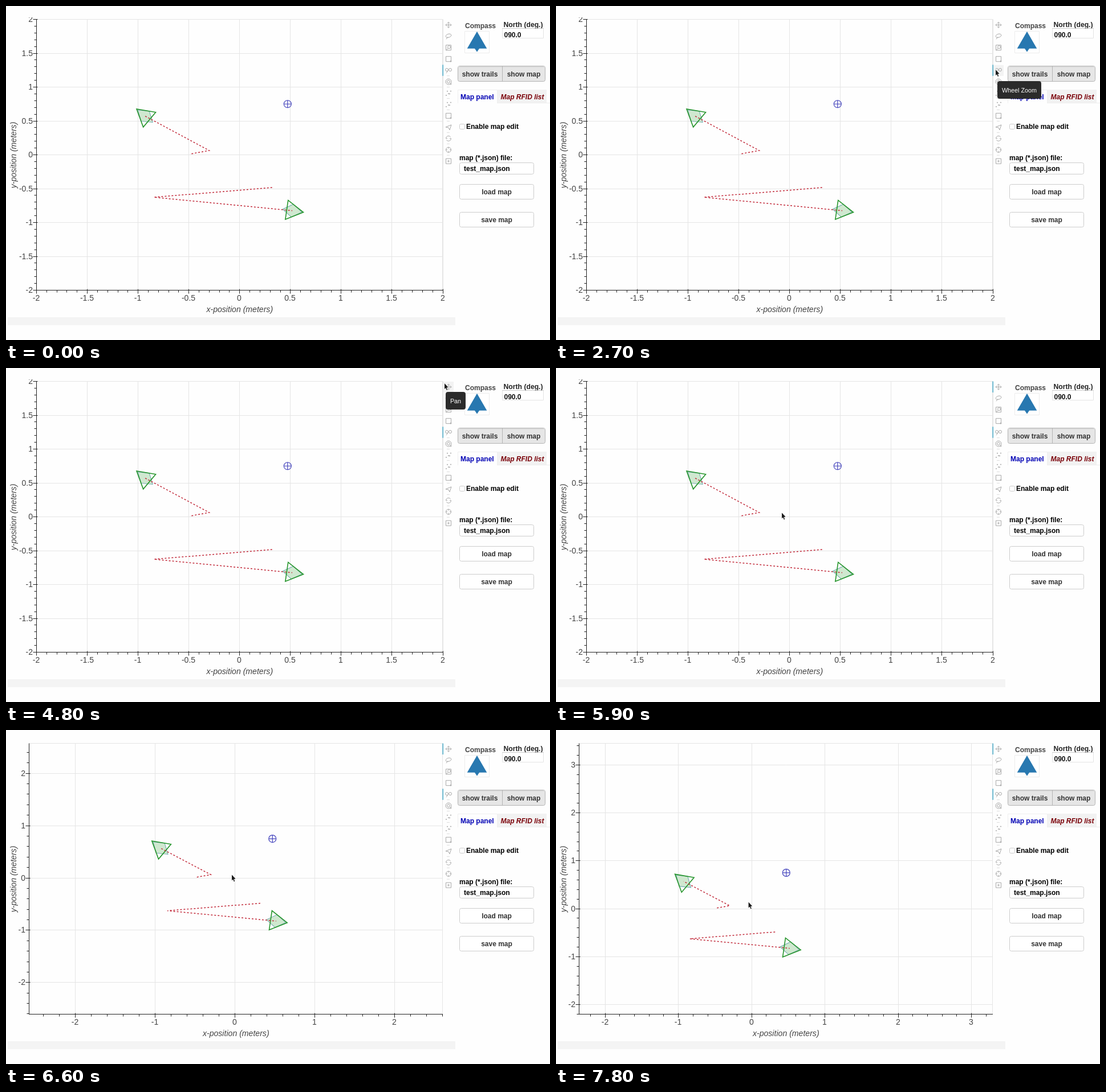
Animation of 954x587 px, one loop 8000 ms. Source, as an HTML page with a canvas:

```html
<!DOCTYPE html>
<html lang="en">
<head>
<meta charset="utf-8">
<title>Position map</title>
<style>
html, body { margin: 0; width: 100%; height: 100%; overflow: hidden; background: #fefefe; }
canvas { display: block; }
</style>
</head>
<body>
<canvas id="stage" width="954" height="587"></canvas>
<script>
const ctx = document.getElementById('stage').getContext('2d');
const LOOP = 8000, FRAME = 100, RIGHT = 766, TOP = 23.5, BOTTOM = 499.5;
const SANS = '"Liberation Sans", Arial, sans-serif';
const BOLD = 'bold 12px ' + SANS;

const ZOOM_TIMES = [6300, 6500, 6600, 7000];
const DRAG = { start: 7200, length: 500, x: -57.4, y: 54.5 };
const MOVES = [
  { start: 1100, end: 1400, x: 624, y: 137 },
  { start: 1500, end: 1800, x: 761.5, y: 118 },
  { start: 1900, end: 2300, x: 771, y: 112 },
  { start: 3300, end: 3600, x: 775, y: 65 },
  { start: 3700, end: 4000, x: 769, y: 27 },
  { start: 5400, end: 5900, x: 396, y: 254.5 },
  { start: 7000, end: 7200, x: 395, y: 248 }
];
const VEHICLES = [
  { heading: 220, trail: [[-0.93, 0.571], [-0.3, 0.063], [-0.474, 0.015]] },
  { heading: 8.3, trail: [[0.518, -0.825], [-0.843, -0.627], [0.32, -0.484]] }
];

const progress = (t, start, length) => Math.min(1, Math.max(0, (t - start) / length));
const smooth = k => k * k * (3 - 2 * k);

function dragOffset(t) {
  const k = progress(t, DRAG.start, DRAG.length);
  const steep = k ** 3 / (k ** 3 + (1 - k) ** 3);
  return { x: DRAG.x * k ** 1.73, y: DRAG.y * steep };
}

function getPointer(t) {
  if (t < 1000) return null;
  const p = { x: 316.5, y: 20 }, drag = dragOffset(t);
  for (const m of MOVES) {
    const k = smooth(progress(t, m.start, m.end - m.start));
    p.x += (m.x - p.x) * k;
    p.y += (m.y - p.y) * k;
  }
  return { x: p.x + drag.x, y: p.y + drag.y };
}

// The plot follows the pointer one frame late
function getView(t) {
  const n = ZOOM_TIMES.filter(z => z <= t).length;
  const zoom = 1.09 ** n, left = n ? 40.5 : 53.5;
  const mid = (left + RIGHT) / 2, drag = dragOffset(t - FRAME);
  const x0 = (n ? 394 + (mid - 394) / zoom : mid) + drag.x;
  const y0 = 255 + 6.5 / zoom + drag.y;
  const sx = (RIGHT - left) / 4 / zoom, sy = (BOTTOM - TOP) / 4 / zoom;
  return { left, mid, step: n ? 1 : 0.5, x: v => x0 + v * sx, y: v => y0 - v * sy };
}

function path(points, closed) {
  ctx.beginPath();
  points.forEach(([x, y]) => ctx.lineTo(x, y));
  if (closed) ctx.closePath();
}

function stroke(color, width = 1) {
  ctx.strokeStyle = color;
  ctx.lineWidth = width;
  ctx.stroke();
}

function line(x1, y1, x2, y2, color, width) {
  path([[x1, y1], [x2, y2]]);
  stroke(color, width);
}

function rect(x, y, w, h, color) {
  ctx.fillStyle = color;
  ctx.fillRect(x, y, w, h);
}

function box(x, y, w, h, fill, border, radius = 0) {
  ctx.beginPath();
  ctx.roundRect(x + 0.5, y + 0.5, w - 1, h - 1, radius);
  ctx.fillStyle = fill;
  ctx.fill();
  stroke(border);
}

function text(str, x, y, color = '#000', font = BOLD, align = 'left') {
  ctx.font = font;
  ctx.fillStyle = color;
  ctx.textAlign = align;
  ctx.fillText(str, x, y);
}

// Runs draw around a moved and turned origin
function at(x, y, degrees, draw) {
  ctx.save();
  ctx.translate(x, y);
  ctx.rotate(degrees * Math.PI / 180);
  draw();
  ctx.restore();
}

// Calls draw(pixel, value, isMajor) for every tick inside the range
function eachTick(toPixel, low, high, step, draw) {
  for (let i = -25; i <= 25; i++) {
    const value = i * step / 5, p = toPixel(value);
    if (p >= low - 0.1 && p <= high + 0.1) draw(Math.floor(p) + 0.5, value, i % 5 === 0);
  }
}

function drawAxes(view) {
  const { left, mid, step } = view;
  const tickFont = '14px ' + SANS, titleFont = 'italic 14.1px ' + SANS;
  const ink = '#444', grid = '#e5e5e5', axis = '#222';
  const xTicks = draw => eachTick(view.x, left, RIGHT, step, draw);
  const yTicks = draw => eachTick(view.y, TOP, BOTTOM, step, draw);

  xTicks((p, v, major) => major && line(p, TOP, p, BOTTOM, grid));
  yTicks((p, v, major) => major && line(left, p, RIGHT, p, grid));
  ctx.strokeStyle = grid;
  ctx.strokeRect(left, TOP, RIGHT - 0.5 - left, BOTTOM - TOP);

  ctx.save();
  ctx.beginPath();
  ctx.rect(0, 20, 790, 530);
  ctx.clip();
  line(left, TOP, left, BOTTOM + 0.5, axis);
  line(left, BOTTOM, RIGHT, BOTTOM, axis);
  xTicks((p, v, major) => {
    line(p, BOTTOM - (major ? 2 : 0), p, BOTTOM + (major ? 6 : 4), axis);
    if (major) text(String(v), p - 0.5, 518, ink, tickFont, 'center');
  });
  yTicks((p, v, major) => {
    line(left + (major ? 2 : 0), p, left - (major ? 6 : 4), p, axis);
    if (major) text(String(v), left - 6.5, p + 4.5, ink, tickFont, 'right');
  });
  text('x-position (meters)', mid, 538, ink, titleFont, 'center');
  at(17.5, 262, -90, () => text('y-position (meters)', 0, 0, ink, titleFont, 'center'));
  ctx.restore();
}

const trianglePoints = r => [[1.155 * r, 0], [-0.577 * r, r], [-0.577 * r, -r]];
const diamondPoints = r => [[r, 0], [0, r / 1.5], [-r, 0], [0, -r / 1.5]];

function drawVehicle(view, { heading, trail }) {
  const points = trail.map(([x, y]) => [view.x(x), view.y(y)]);
  at(...points[0], heading, () => {
    path(diamondPoints(17), true);
    ctx.fillStyle = '#cfe8cf';
    ctx.fill();
    stroke('#78aeb4', 1.1);
    path(trianglePoints(17), true);
    stroke('#25952b', 1.6);
  });
  ctx.setLineDash([3, 3]);
  path(points.reverse());
  stroke('#c22b3b', 1.5);
  ctx.setLineDash([]);
}

function drawBeacon(x, y) {
  at(x, y, 0, () => {
    ctx.beginPath();
    ring(6.5)();
    spokes(0, 6.5)();
    stroke('#4444bd', 1.2);
  });
}

// Icon parts add to the current path around the origin
const ring = (r, x = 0, y = 0) => () => { ctx.moveTo(x + r, y); ctx.arc(x, y, r, 0, 7); };
const square = () => ctx.rect(-4.5, -4.5, 9, 9);
const spokes = (from, to, head = 0) => () => {
  for (let i = 0; i < 4; i++) {
    ctx.moveTo(from, 0);
    ctx.lineTo(to, 0);
    ctx.moveTo(to - head, -head);
    ctx.lineTo(to, 0);
    ctx.lineTo(to - head, head);
    ctx.rotate(Math.PI / 2);
  }
};
const scatter = () => {
  for (let i = 0; i < 5; i++) ctx.rect(2 * i - 4.5, 4 * Math.cos(i * 2.5) - 0.5, 1, 1);
};
const tail = () => { ctx.moveTo(-1, 1); ctx.lineTo(-4, 5); };
const lens = ring(2.5, 1, -1), dot = ring(1, 4, 4);
const lasso = () => ctx.ellipse(0, -1, 5, 3, -0.3, 0, 7);
const plane = () => [[-5, 0], [5, -4], [2, 5], [0, 1], [-5, 0]].forEach(([x, y]) => ctx.lineTo(x, y));
const arcs = () => [0, 180].forEach(() => {
  ctx.rotate(Math.PI);
  ctx.moveTo(4.5, 0);
  ctx.arc(0, 0, 4.5, 0, 2.5);
  ctx.moveTo(4.5, 0);
  ctx.lineTo(2, 0);
});
const ICONS = [
  [spokes(0, 5, 2)], [lasso, tail], [square, lens, tail], [square, dot],
  [ring(2.5, -3, -1), ring(2.5, 3, -1), tail], [ring(5), ring(2.5), dot],
  [scatter], [scatter], [square, dot], [plane], [arcs],
  [ring(4.5), spokes(2, 5)], [square, spokes(0, 2)]
];

function drawToolbar(t, pointer) {
  const rowHeight = 19.95;
  const bar = row => rect(765.5, 23.5 + row * rowHeight, 1.5, 19.5, '#4bacc9');
  ICONS.forEach((parts, i) => {
    const y = 33 + i * rowHeight;
    const hovered = pointer && pointer.x >= 767 && Math.abs(pointer.y + 1 - y) < rowHeight / 2;
    if (hovered) rect(767, y - 9, 18, 19, '#f3f3f3');
    if (i > 3 && i < 12) line(773, y + 9.8, 778, y + 9.8, '#dedede');
    at(776, y + 0.3, 0, () => {
      ctx.beginPath();
      parts.forEach(part => part());
      stroke('#a9a9a9');
    });
  });
  bar(4);
  if (t >= 5200) bar(0);
}

function button(label, y) {
  box(795, y, 131, 27, '#fff', '#ccc', 3);
  text(label, 860.5, y + 18, '#333', BOLD, 'center');
}

function drawPanel() {
  rect(3, 547, 785, 14, '#f4f4f4');

  text('Compass', 805, 39, '#444');
  box(804, 44, 44, 39, '#fff', '#ececec');
  at(826, 64.7, -90, () => {
    ctx.fillStyle = '#2878b0';
    [trianglePoints(17.3), diamondPoints(16)].forEach(points => { path(points, true); ctx.fill(); });
  });

  text('North (deg.)', 872.5, 37, '#222', 'bold 12.2px ' + SANS);
  box(870, 39, 73, 18, '#fff', '#e4e4e4');
  line(870, 39.5, 943, 39.5, '#ccc');
  text('090.0', 873.5, 55, '#111');

  box(792, 105, 154, 28, '#e6e6e6', '#b4b4b4', 3);
  rect(793, 106, 152, 2, '#dadada');
  line(870.5, 106, 870.5, 132, '#b4b4b4');
  text('show trails', 831, 124, '#333', BOLD, 'center');
  text('show map', 908, 124, '#333', BOLD, 'center');

  rect(862, 147, 86, 24, '#f2f2f2');
  line(861, 170.5, 954, 170.5, '#eee');
  path([[792.5, 171], [792.5, 147.5], [861.5, 147.5], [861.5, 171]]);
  stroke('#efefef');
  text('Map panel', 797, 164, '#0000b4');
  text('Map RFID list', 867.5, 164, '#7a0008', 'italic ' + BOLD);

  box(795, 207, 10, 10, '#fff', '#ccc', 2);
  text('Enable map edit', 807, 216);
  text('map (*.json) file:', 795, 271);
  box(795, 275, 131, 21, '#fff', '#ccc', 3);
  text('test_map.json', 803, 290);
  button('load map', 313);
  button('save map', 362);
}

function drawTooltip(label, x, y, w) {
  box(x, y, w, 31, '#2b2b2b', '#2b2b2b', 3);
  text(label, x + w / 2, y + 19.5, '#fff', '10.8px ' + SANS, 'center');
}

function drawCursor({ x, y }) {
  at(x, y, 0, () => {
    path([[0, 0], [0, 10], [2.2, 8], [3.8, 12], [5.2, 11.4], [3.8, 7.5], [6.6, 7]], true);
    stroke('#fff', 1.4);
    ctx.fillStyle = '#1c1c1c';
    ctx.fill();
  });
}

function render(t) {
  const view = getView(t), pointer = getPointer(t);
  rect(0, 0, 954, 587, '#fefefe');
  drawPanel();
  drawAxes(view);
  VEHICLES.forEach(v => drawVehicle(view, v));
  drawBeacon(view.x(0.472), view.y(0.75));
  drawToolbar(t, pointer);
  if (t >= 2700 && t < 3400) drawTooltip('Wheel Zoom', 774, 132, 77);
  if (t >= 4800 && t < 5200) drawTooltip('Pan', 771, 42, 35);
  if (pointer) drawCursor(pointer);
}

const start = performance.now();
function tick() {
  const t = (performance.now() - start) % LOOP;
  render(Math.floor(t / FRAME) * FRAME);
  requestAnimationFrame(tick);
}
tick();
</script>
</body>
</html>
```
